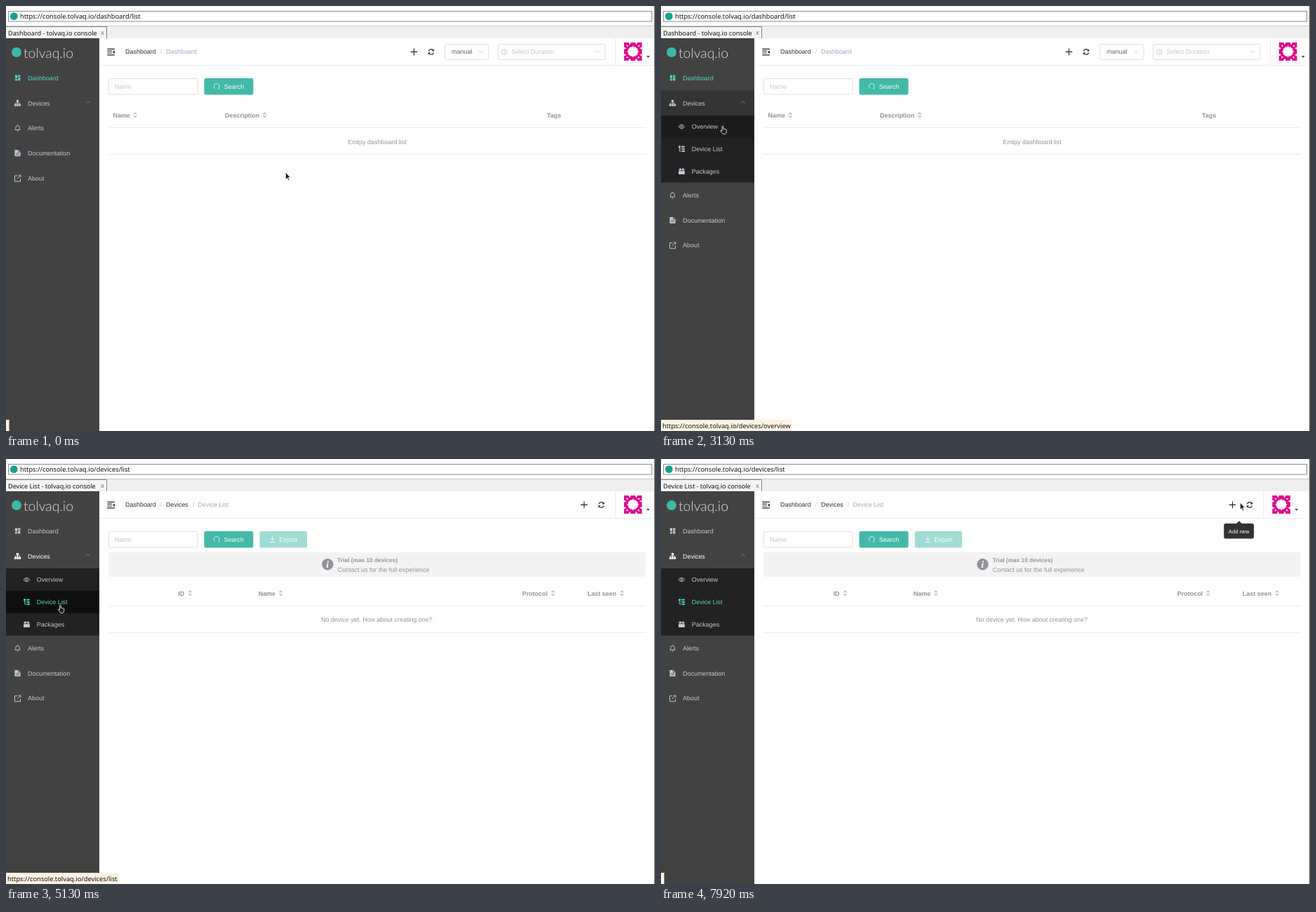
Write an HTML page that moves like this. It is 925x606 px and loops after 8000 ms.

```html
<!DOCTYPE html>
<html lang="en">
<head>
<meta charset="utf-8">
<title>Console</title>
<style>
html, body { margin: 0; width: 100%; height: 100%; overflow: hidden; background: #fff; }
svg { display: block; width: 100vw; height: 100vh; }
text { font-family: "Liberation Sans", Arial, sans-serif; font-size: 8.96px; text-rendering: geometricPrecision; white-space: pre; }
.chrome { font-family: "Noto Sans", "Open Sans", sans-serif; font-size: 9.28px; fill: #111; }
.tab { font-size: 9.1px; }
.brand { font-family: Lato, "Open Sans", sans-serif; font-weight: 300; font-size: 19.4px; fill: #dedede; }
.bold { font-weight: 700; }
.line { fill: none; stroke: currentColor; }
</style>
</head>
<body>
<svg id="stage" viewBox="0 0 925 606"></svg>
<script>
const LOOP = 8000;
const HOST = "https://console.tolvaq.io/";
const GREY = "#909399", PALE = "#c0c4cc", MENU = "#bfcbd9", TEAL = "#4fd8c3";

// Moments at which the picture is refreshed: first, last, count.
const bursts = [
  [0, 0, 1], [250, 250, 1], [880, 1210, 9], [1580, 1790, 3], [2170, 2420, 3], [3000, 3130, 2],
  [3290, 3420, 2], [3580, 3580, 1], [4130, 4380, 3], [4540, 4670, 2], [4830, 4830, 1],
  [5000, 5250, 3], [5420, 5670, 3], [5830, 6330, 5], [6500, 6500, 1], [6670, 6790, 2],
  [6960, 7080, 2], [7250, 7380, 2], [7920, 7920, 1]
];
const ticks = bursts.flatMap(([a, b, n]) =>
  Array.from({ length: n }, (_, i) => n > 1 ? a + (b - a) * i / (n - 1) : a));

// Pointer keys: time, x, y.
const route = [
  [0, 398, 237], [250, 395, 237], [840, 395, 237], [1210, 293, 171], [1480, 293, 171],
  [1790, 104, 134], [2900, 104, 134], [3130, 84.5, 170.5], [3200, 84.5, 170.5], [3420, 76, 196],
  [3580, 74, 207.5], [5340, 74, 207.5], [5420, 104, 201], [5670, 235, 228], [5830, 321, 224],
  [6330, 645, 157], [6500, 722, 132], [6790, 782, 94], [6960, 804, 75], [7080, 820, 65],
  [7250, 824, 62], [8000, 825, 62]
];

const clamp = v => Math.max(0, Math.min(1, v));
const ramp = (t, a, b) => clamp((t - a) / (b - a));
const smooth = p => p * p * (3 - 2 * p);

// The CSS "ease" curve.
function ease(p) {
  const bez = (s, a, b) => 3 * s * (1 - s) ** 2 * a + 3 * s * s * (1 - s) * b + s ** 3;
  let lo = 0, hi = 1;
  for (let i = 0; i < 20; i++) {
    const mid = (lo + hi) / 2;
    if (bez(mid, .25, .25) < p) lo = mid; else hi = mid;
  }
  return bez(lo, .1, 1);
}

function pointAt(t) {
  const i = Math.max(1, route.findIndex(k => k[0] >= t));
  const [t0, x0, y0] = route[i - 1], [t1, x1, y1] = route[i];
  const p = ramp(t, t0, t1);
  return [x0 + (x1 - x0) * p, y0 + (y1 - y0) * p];
}

// Markup helpers
const rect = (x, y, w, h, fill, more = "") =>
  `<rect x="${x}" y="${y}" width="${w}" height="${h}" fill="${fill}" ${more}/>`;
const text = (x, y, s, fill, more = "") => `<text x="${x}" y="${y}" fill="${fill}" ${more}>${s}</text>`;
const path = (d, color, width = 1, more = "") =>
  `<path class="line" d="${d}" style="color:${color}" stroke-width="${width}" ${more}/>`;
const solid = (d, fill) => `<path d="${d}" fill="${fill}"/>`;
const at = (x, y, s) => `<g transform="translate(${x} ${y})">${s}</g>`;
const bold = 'class="bold"';
const rule = y => rect(146, y, 766, 1, "#e8ebf1");
const chevron = (x, y) => path(`M${x - 3.3} ${y - 1.7}l3.3 3.3 3.3 -3.3`, PALE, .9);
const box = (x, y, w, h) => rect(x, y, w, h, "#fff", 'rx="2.5" stroke="#dcdfe6"');
const carets = (x, y) => solid(`M${x - 3.2} ${y - 1}h6.4l-3.2 -3.2zM${x - 3.2} ${y + 1}h6.4l-3.2 3.2z`, PALE);
const head = (x, y, s, caretX) => text(x, y + 3.4, s, GREY, bold) + (caretX ? carets(caretX, y) : "");

const icons = {
  grid: '<path d="M-3.7 -4h3.2v4.6h-3.2zM.5 -4h3.2v3h-3.2zM-3.7 1.4h3.2v2.6h-3.2zM.5 -.2h3.2v4.2h-3.2z" fill="currentColor"/>',
  tree: '<path d="M-1.6 -4.5h3.2v3h-3.2zM-4.6 1.4h2.8v3h-2.8zM-1.4 1.4h2.8v3h-2.8zM1.8 1.4h2.8v3h-2.8z" fill="currentColor"/><path class="line" d="M0 -2V2M-3.2 2V0H3.2V2" stroke-width=".8"/>',
  bell: '<path class="line" d="M-3.8 2.5H3.8M-2.8 2.5V-.5a2.8 3 0 0 1 5.6 0V2.5M-1 4h2M0 -3.5v-1" stroke-width=".9"/>',
  file: '<path d="M-4 -4.5h5l3 3v6h-8z" fill="currentColor"/><path class="line" d="M-2.2 .2h4.4M-2.2 2.3h4.4M1 -4.3v2.8h2.8" style="color:#424242" stroke-width=".8"/>',
  link: '<path class="line" d="M0 -3.5h-4v8h8V.7M1.5 -4.2H4.4V-1.2M4.2 -4L-.8 1" stroke-width="1"/>',
  eye: '<path class="line" d="M-4.4 0Q0 -5.6 4.4 0Q0 5.6 -4.4 0z" stroke-width=".9"/><circle r="1.4" class="line" stroke-width=".9"/>',
  list: '<path d="M-4.4 -4.4h3v2.6h-3zM-.2 -4.2h4.6v2h-4.6zM.8 -1h3.6v2h-3.6zM.8 2.2h3.6v2h-3.6z" fill="currentColor"/><path class="line" d="M-3 -2V3.2H.8M-3 0H.8" stroke-width=".8"/>',
  pack: '<path d="M-3.2 -4h2.8v2.8h-4zM.4 -4h2.8l1.2 2.8h-4zM-4.4 -.6h8.8v4.8h-8.8z" fill="currentColor"/>'
};
const item = (id, icon, x, y, label, labelX) =>
  `<g id="${id}" style="color:${MENU}">${at(x, y, icons[icon])}${text(labelX, y + 3.3, label, "currentColor")}</g>`;

const nameAndSearch =
  box(146.5, 103.5, 126.5, 22.5) + text(155, 118.2, "Name", PALE) +
  rect(282.5, 103, 70, 23.5, "#43b9aa", 'rx="2.5"') +
  path("M298 117.6a3.9 3.9 0 1 1 4.4 .2M302.4 117.2l1.9 1.9", "#fff", .8) + text(310.8, 118.2, "Search", "#fff");

const listPage = nameAndSearch +
  head(152.5, 155.5, "Name", 184.3) + head(312, 155.5, "Description", 368.6) + head(771, 155.5, "Tags") +
  rule(173) + text(529, 196.5, "Emtpy dashboard list", GREY, 'text-anchor="middle"') + rule(211);

const devicePage = nameAndSearch +
  rect(361.7, 103, 67.5, 23.5, "#a1dcd5", 'rx="2.5"') +
  path("M376.3 118.5h7.4M380 110.5v5.5M377.8 114l2.2 2.2 2.2 -2.2", "#fff", .9) + text(389.5, 118.2, "Export", "#fff") +
  rect(146, 133, 765.7, 35, "#f3f3f4", 'rx="2.5"') +
  `<circle cx="458.5" cy="150.2" r="8.2" fill="${GREY}"/>` +
  text(458.3, 155, "i", "#fff", 'text-anchor="middle" style="font:italic bold 14px \'Liberation Serif\',serif"') +
  text(472.5, 147, "Trial (max 10 devices)", GREY, bold + ' style="font-size:8.3px"') +
  text(472.8, 161.4, "Contact us for the full experience", GREY) +
  head(245.5, 191.3, "ID", 262.5) + head(359.8, 191.3, "Name", 391.7) +
  head(735.8, 191.3, "Protocol", 779.7) + head(828.8, 191.3, "Last seen", 878) +
  rule(209) + text(528.5, 232.3, "No device yet. How about creating one?", GREY, 'text-anchor="middle"') + rule(247);

const tools =
  path("M-4.8 0h9.6M0 -4.8v9.6", "#222", 1.1) +
  at(24.5, 0, path("M-3.7 -1A3.8 3.8 0 0 1 3.2 -2M3.7 1A3.8 3.8 0 0 1 -3.2 2", "#222", 1.1) +
    solid("M4.2 -4v3.2h-3.2zM-4.2 4v-3.2h3.2z", "#222"));

const badge = rect(0, 0, 25.6, 26, "#e0098c") +
  solid("M9 6.5h7.6l3 3v7l-3 3h-7.6l-3 -3v-7z", "#fff") +
  [0, 90, 180, 270].map(a => `<g transform="rotate(${a} 12.8 13)">` +
    solid("M6.4 0h3.4l-1.7 3.6zM15.8 0h3.4l-1.7 3.6zM3.4 3.2l3 1.2 -2 2.2zM11.4 6.6l1.4 -2.2 1.4 2.2z", "#fff") + "</g>").join("");

const stage = document.getElementById("stage");
stage.innerHTML =
  `<defs><clipPath id="fold"><rect id="foldBox" x="0" y="156" width="133" height="0"/></clipPath></defs>` +
  rect(0, 0, 925, 606, "#fff") +
  `<g id="pageA">${listPage}</g><g id="pageB">${devicePage}</g>` +
  // Header
  `<rect id="headRule" x="133" y="84" height="1" fill="#ececec"/>` +
  path("M144.3 61.4h10.6M144.3 64.2h6.6M144.3 67h6.6M144.3 69.8h10.6", "#222", 1.2) + solid("M155 63.4v4.6l-3 -2.3z", "#222") +
  text(170, 68.3, "Dashboard", "#303133") + text(219.8, 68.3, "/", PALE) +
  `<g id="crumbA">${text(228, 68.3, "Dashboard", "#97a8be")}${text(276.8, 68.3, "/", PALE, 'id="crumbSlash"')}</g>` +
  `<g id="crumbB">${text(228, 68.3, "Devices", "#303133")}${text(265.8, 68.3, "/", PALE)}${text(273.5, 68.3, "Device List", "#97a8be")}</g>` +
  `<g id="filters">${box(625.5, 54.5, 62.5, 22)}${text(635, 68.3, "manual", "#606266")}${chevron(677, 65)}` +
  `${box(701.5, 54.5, 152.5, 22)}<circle cx="710" cy="65.3" r="3.7" class="line" style="color:${PALE}" stroke-width=".9"/>` +
  `${path("M710 63v2.6h2", PALE, .8)}${text(720.5, 68.3, "Select Duration", PALE)}${chevron(843, 65)}</g>` +
  `<g id="tools">${tools}</g>` +
  `<g id="user">${rect(868, 46, 1, 38, "#ececec")}${at(880.8, 52, badge)}${solid("M912.7 71h5l-2.5 2.7z", "#444")}</g>` +
  rect(133, 46, 0, 1.6, "#2b97e0", 'id="progress"') +
  // Sidebar
  rect(0, 46, 133, 560, "#424242") +
  `<circle cx="15" cy="66" r="7" fill="#3fb9a8"/><text class="brand" x="25" y="73.6">tolvaq.io</text>` +
  rect(0, 120.4, 133, 35.6, "#2c2c2c", 'id="hotDevices"') +
  item("mDash", "grid", 16.6, 102.5, "Dashboard", 31) + item("mDevices", "tree", 16.5, 138.4, "Devices", 31) +
  `<path id="arrow" class="line" d="M-2.9 -1.4L0 1.4L2.9 -1.4" style="color:#85898f" stroke-width=".9"/>` +
  `<g clip-path="url(#fold)">${rect(0, 156, 133, 96, "#222")}` +
  rect(0, 156, 133, 31.9, "#0f0f0f", 'id="hotOverview"') + rect(0, 187.9, 133, 31.9, "#0f0f0f", 'id="hotList"') +
  item("mOver", "eye", 29.4, 172, "Overview", 43.8) + item("mList", "list", 29.4, 203.9, "Device List", 43.8) +
  item("mPack", "pack", 29.4, 235.8, "Packages", 43.8) + "</g>" +
  `<g id="below">${item("mAlerts", "bell", 16.5, 174, "Alerts", 31)}${item("mDocs", "file", 16.5, 209.8, "Documentation", 31)}` +
  `${item("mAbout", "link", 16.5, 245.5, "About", 31)}</g>` +
  // Browser frame
  rect(0, 28, 925, 18, "#efefef") + rect(0, 28, 925, 1, "#c9c9c9") +
  rect(3.5, 7.5, 917, 14.5, "#fff", 'stroke="#8c8c8c"') +
  `<circle cx="11.3" cy="14.6" r="5.4" fill="#159f8c"/><text id="url" class="chrome" x="20" y="18"></text>` +
  rect(0, 29, 143, 17, "#f4f4f4") + path("M0 29.5H143.5V46", "#858585") +
  `<text id="tab" class="chrome tab" x="3" y="41.5"></text>` + text(135.2, 41.3, "x", "#666", 'style="font-size:9px"') +
  rect(924, 0, 1, 606, "#555") +
  `<rect id="statusBox" x="0" y="590" height="16" fill="#fdf3e4"/><text id="status" class="chrome" x="2" y="601.6"></text>` +
  `<g id="tip">${rect(802.3, 92, 42.7, 21.6, "#303133", 'rx="2.5"')}${solid("M820 92.2l4 -4 4 4z", "#303133")}` +
  `${text(808.8, 105.5, "Add new", "#fff", 'style="font-size:7.68px"')}</g>` +
  `<path id="pointer" fill="#1c1c1c" stroke="#fff" stroke-width=".8" stroke-linejoin="round"/>`;

const ARROW = "M.5 0V10.2L2.8 8.2L4.4 12L6 11.3L4.4 7.6H7.4Z";
const HAND = "M2.6 1.2Q3.4 -.1 4.3 1.2V4.6L8 5.5Q9.2 6 8.9 7.4L8.2 11Q7.9 12 7 12H4.2Q3.4 11.8 3 11L.5 7.8Q.2 6.6 1.4 6.6L2.6 7.6Z";

const el = {};
stage.querySelectorAll("[id]").forEach(n => el[n.id] = n);
const set = (id, o) => { for (const k in o) el[id].setAttribute(k, o[k]); };
const fade = (id, v) => set(id, { opacity: v });
const move = (id, x, y = 0) => set(id, { transform: `translate(${x} ${y})` });
const tint = (id, c) => { el[id].style.color = c; };
const write = (id, s) => { if (el[id].textContent !== s) el[id].textContent = s; };

function draw(t) {
  const onList = t >= 4130, active = t >= 4250, narrow = t >= 7920;

  write("url", HOST + (onList ? "devices/list" : "dashboard/list"));
  write("tab", (onList ? "Device List" : "Dashboard") + " - tolvaq.io console");
  const link = t >= 3130 && t < 3400 ? "overview" : t >= 3400 && t < 5500 ? "list" : "";
  write("status", link && HOST + "devices/" + link);
  set("statusBox", { width: link === "overview" ? 187 : link ? 161 : 4.5 });

  // Sidebar
  const open = smooth(ramp(t, 2130, 2425)), drop = 95.7 * open;
  set("foldBox", { height: drop });
  move("below", 0, drop);
  set("arrow", { transform: `translate(116.7 137.2) scale(1 ${1 - 2 * open})` });
  fade("hotDevices", t < 1790 ? 0 : t < 3130 ? ramp(t, 1500, 2000) : 1 - ramp(t, 3030, 3290));
  fade("hotOverview", t < 3130 ? 0 : t < 3290 ? .3 : t < 3420 ? .5 : 0);
  fade("hotList", t < 3290 ? 0 : t < 5420 ? ramp(t, 3200, 3580) : 1 - ramp(t, 5350, 5600));
  tint("mDash", active ? MENU : TEAL);
  tint("mDevices", active ? "#fff" : MENU);
  tint("mList", active ? TEAL : MENU);

  // Page change
  const out = ease(ramp(t, 4075, 4575)), back = ease(ramp(t, 4680, 5180));
  move("pageA", 19.2 * out);
  fade("pageA", 1 - out);
  move("pageB", -19.2 * (1 - back));
  fade("pageB", back);
  set("progress", { width: !onList || t >= 4380 ? 0 : 244 + (t - 4130) * 1.6 });

  // Header
  const crumb = ease(ramp(t, 4140, 4650));
  move("crumbA", onList ? 10 : 0);
  fade("crumbA", !onList ? 1 : active ? 0 : .85);
  fade("crumbSlash", onList ? 1 : 0);
  move("crumbB", 12.8 * (1 - crumb));
  fade("crumbB", crumb);
  fade("filters", onList ? 0 : 1);
  const shift = narrow ? -9.5 : 0;
  move("tools", (onList ? 824 : 581.5) + shift, 65.4);
  move("user", shift);
  set("headRule", { width: narrow ? 782 : 791 });

  fade("tip", ramp(t, 7180, 7360));
  const [x, y] = pointAt(t);
  set("pointer", { d: t >= 1790 && t < 5950 ? HAND : ARROW });
  move("pointer", x, y);
}

const start = performance.now();
function loop(now) {
  const t = Math.max(0, now - start) % LOOP;
  draw(ticks.filter(k => k <= t).pop());
  requestAnimationFrame(loop);
}
draw(0);
requestAnimationFrame(loop);
</script>
</body>
</html>
```
